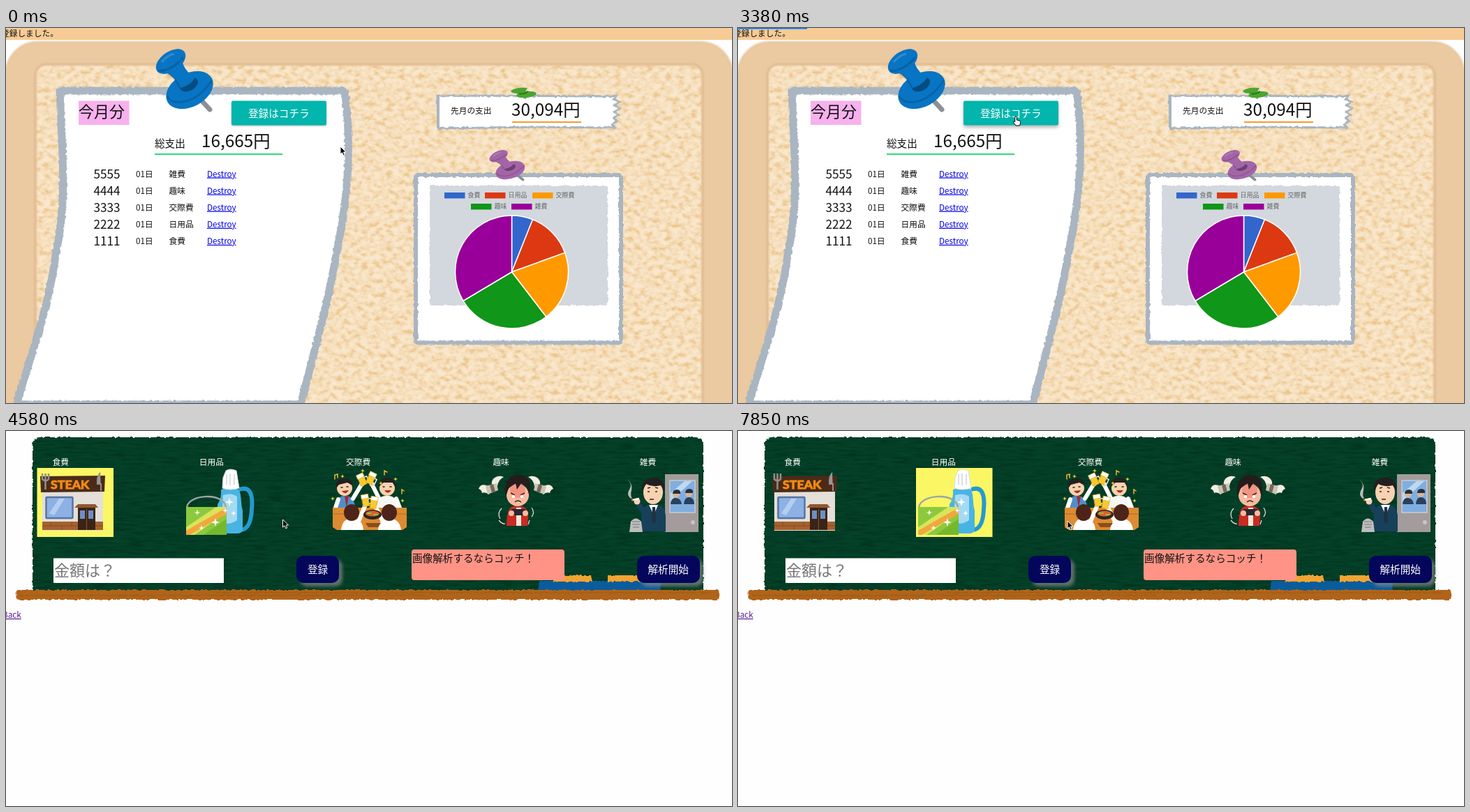
An HTML page for the animation above (8 s loop, 1040 px wide and 538 px high).

```html
<!DOCTYPE html>
<html lang="ja">
<head>
<meta charset="utf-8">
<title>家計簿</title>
<style>
html, body { margin: 0; width: 100%; height: 100%; overflow: hidden; background: #fefefe; }
svg { position: absolute; left: 0; top: 0; width: 1040px; height: 538px; }
text { font-family: "Noto Sans CJK JP", "Noto Sans CJK", "Noto Sans", sans-serif; font-size: 11.7px; fill: #111; white-space: pre; }
.link { fill: #00e; text-decoration: underline; }
.white { fill: #fff; }
.mid { font-size: 14.6px; }
.big { font-size: 22px; }
.sum { font-size: 24.3px; }
.key { font-size: 9px; fill: #666; }
#top { will-change: transform; }
</style>
</head>
<body>
<svg id="home" viewBox="0 0 1040 538">
  <defs>
    <filter id="rough" x="-5%" y="-8%" width="110%" height="116%" color-interpolation-filters="sRGB">
      <feTurbulence type="fractalNoise" baseFrequency=".2" numOctaves="2" seed="4"/>
      <feColorMatrix values="1 0 0 0 0  0 1 0 0 0  0 0 1 0 0  0 0 0 0 1"/>
      <feDisplacementMap in="SourceGraphic" scale="4" xChannelSelector="R" yChannelSelector="G"/>
    </filter>
    <filter id="cork" x="0" y="0" width="100%" height="100%" color-interpolation-filters="sRGB">
      <feTurbulence type="fractalNoise" baseFrequency=".11 .15" numOctaves="2" seed="7"/>
      <feColorMatrix values="2 0 0 0 -.45  2 0 0 0 -.45  2 0 0 0 -.45  0 0 0 0 1"/>
      <feComponentTransfer>
        <feFuncR type="table" tableValues=".93 .955 .97 .98"/>
        <feFuncG type="table" tableValues=".78 .845 .89 .91"/>
        <feFuncB type="table" tableValues=".56 .68 .77 .81"/>
      </feComponentTransfer>
      <feComposite operator="in" in2="SourceGraphic"/>
    </filter>
    <filter id="chalk" x="-2%" y="-5%" width="104%" height="110%" color-interpolation-filters="sRGB">
      <feTurbulence type="fractalNoise" baseFrequency=".2" numOctaves="2" seed="4"/>
      <feColorMatrix values="1 0 0 0 0  0 1 0 0 0  0 0 1 0 0  0 0 0 0 1" result="warp"/>
      <feDisplacementMap in="SourceGraphic" in2="warp" scale="4" xChannelSelector="R" yChannelSelector="G" result="edge"/>
      <feTurbulence type="fractalNoise" baseFrequency=".04 .3" numOctaves="3" seed="2"/>
      <feColorMatrix values="1 0 0 0 0  1 0 0 0 0  1 0 0 0 0  0 0 0 0 1"/>
      <feComponentTransfer>
        <feFuncR type="table" tableValues="0 .015 .03"/>
        <feFuncG type="table" tableValues=".18 .245 .28"/>
        <feFuncB type="table" tableValues=".11 .15 .18"/>
      </feComponentTransfer>
      <feComposite operator="in" in2="edge"/>
    </filter>
    <filter id="soft"><feGaussianBlur stdDeviation="1.2"/></filter>
    <g id="pin">
      <path d="M66 72L78 85" stroke="#8b9097" stroke-width="7" stroke-linecap="round"/>
      <ellipse cx="49" cy="57" rx="36" ry="24" transform="rotate(-28 49 57)" fill="currentColor"/>
      <path d="M17 66Q24 78 44 73T81 43" fill="none" stroke="#000" stroke-width="3" opacity=".14"/>
      <ellipse cx="48" cy="49" rx="14" ry="9" transform="rotate(-28 48 49)" opacity=".35"/>
      <path d="M12 30L37 10Q40 30 57 39Q50 51 35 54Q29 38 12 30Z" fill="currentColor"/>
      <path d="M35 54Q30 40 15 32" fill="none" stroke="#000" stroke-width="3" opacity=".14"/>
      <ellipse cx="22" cy="16" rx="24" ry="14" transform="rotate(-35 22 16)" fill="currentColor"/>
      <path d="M4 29Q22 31 40 10" fill="none" stroke="#000" stroke-width="3" opacity=".16"/>
      <path d="M9 17Q17 7 27 5" fill="none" stroke="#fff" stroke-width="3" opacity=".16"/>
    </g>
  </defs>

  <rect width="1040" height="17" fill="#f6cb95"/>
  <rect y="17" width="1040" height="521" fill="#fff"/>
  <rect x="0" y="20" width="1040" height="600" rx="45" fill="#ebc9a1" stroke="#e8c59c" stroke-width="2" filter="url(#soft)"/>
  <rect x="42" y="52" width="956" height="530" rx="16" fill="#f5dcb6" filter="url(#cork)"/>
  <rect x="42" y="52" width="956" height="530" rx="16" fill="none" stroke="#e3be93" stroke-width="4" filter="url(#soft)"/>

  <g fill="#fff" stroke="#a9b5c1" stroke-linejoin="round" filter="url(#rough)">
    <path stroke-width="11" d="M77 90H481Q486 90 486 96C496 180 487 260 474 320C460 400 440 470 422 540H15C35 470 62 400 72 320C88 250 80 170 77 90Z"/>
    <path stroke-width="3" d="M618 97L866 98 875 97 870 102 879 106 871 111 880 115 871 120 878 125 870 129 876 134 868 138 872 143 760 142 619 144Z"/>
    <rect stroke-width="6" x="587" y="211" width="294" height="240.500" rx="3"/>
    <rect x="607" y="226" width="255" height="172" rx="3" fill="#d2d8dd" stroke="none"/>
  </g>
  <path d="M619 98V143" stroke="#a9b5c1" stroke-width="4"/>

  <use href="#pin" x="214" y="32" color="#0874c4"/>
  <use href="#pin" transform="translate(692 176) scale(.62 .49)" color="#a465a8"/>
  <path d="M738 96L745 101" stroke="#8b9097" stroke-width="3"/>
  <path d="M723 90Q732 84 747 86L744 91Q760 90 760 95Q753 101 738 100Q728 99 733 94Q724 94 723 90Z" fill="#4ba52f"/>
  <path d="M735 94Q741 96 748 91" fill="none" stroke="#287a1d" stroke-width="2"/>

  <text x="-7" y="12">登録しました。</text>
  <rect x="104" y="104.500" width="72.500" height="34.500" fill="#f7b1ed"/>
  <text x="104" y="128" class="big">今月分</text>
  <rect id="btn" x="323" y="104.500" width="136" height="35" rx="2" fill="#02b5ad"/>
  <text x="347" y="127.500" class="mid white">登録はコチラ</text>
  <text x="213" y="171" class="mid">総支出</text>
  <text x="280" y="171" class="sum">16,665円</text>
  <rect x="213" y="180" width="183" height="2" fill="#2cdb79"/>
  <text x="637" y="123">先月の支出</text>
  <text x="724" y="126" class="sum">30,094円</text>
  <rect x="725" y="134" width="99" height="2" fill="#f49b31"/>
  <g id="rows"></g>
  <g id="chart"></g>
</svg>

<svg id="form" viewBox="0 0 1040 538">
  <rect width="1040" height="538" fill="#fefefe"/>
  <rect x="38" y="9" width="961" height="226" rx="10" fill="#043f27" filter="url(#chalk)"/>
  <g filter="url(#rough)">
    <path d="M764 215H938V230H762Z" fill="#0a5c9c"/>
    <path d="M786 207H838L840 216H784ZM862 207H934L936 216H862Z" fill="#f2a431"/>
    <rect x="14.500" y="228" width="1007" height="14" rx="4" fill="#b0641a"/>
    <path d="M20 236H600M300 232H1010" stroke="#a75b13" stroke-width="1.500"/>
  </g>
  <g id="labels"></g>
  <rect id="pick" y="53" width="109.500" height="99" fill="#fbf664"/>

  <!-- restaurant -->
  <g>
    <path d="M52 86H139V143H52Z" fill="#e4dfd9"/>
    <path d="M52 130H139V142H52Z" fill="#a4622f"/>
    <path d="M52 136H139M64 130V136M80 136V142M94 130V136" stroke="#874b20"/>
    <path d="M49 65L142 64 141 87 50 88Z" fill="#4b2b18"/>
    <text x="64" y="83" style="font:bold 17.800px Lato,sans-serif;fill:#f58b13;stroke:#f58b13">STEAK</text>
    <rect x="57.500" y="95" width="38" height="30" rx="1" fill="#8db0e5" stroke="#57749f" stroke-width="2.500"/>
    <path d="M62 118L76 97H84L69 121Z" fill="#b5cdef"/>
    <path d="M98 110L103 105H128L132 110Z" fill="#90572f"/>
    <path d="M103 110H128V142H103Z" fill="#3b2417"/>
    <path d="M106 114H113V126H106ZM118 114H125V126H118Z" fill="#6d8fc6"/>
    <path d="M115.500 112V142" stroke="#805536"/>
    <path d="M52 61V69Q57 74 61 69V61M56.500 61V84" fill="none" stroke="#8f8f8f" stroke-width="2.500"/>
    <path d="M135 60Q130 66 131 76H136V86" fill="#999" stroke="#8f8f8f" stroke-width="2"/>
  </g>

  <!-- detergent -->
  <g>
    <path d="M334 84C350 78 354 92 352 112Q351 140 337 142" fill="none" stroke="#249ad0" stroke-width="6"/>
    <path d="M308 84Q321 79 334 84C338 95 336 104 339 114V142Q338 147 331 147H307Q302 147 303 140V105Q309 97 308 84Z" fill="#48b4e3"/>
    <path d="M311 92Q323 88 331 94V128Q318 137 309 129Z" fill="#a4daf2"/>
    <path d="M310 82L311 67 315 57Q321 53 330 57L334 82Q321 86 310 82Z" fill="#fff" stroke="#d3dde0"/>
    <path d="M316 62V77M321 61V78M327 62V77" stroke="#cbd6da" stroke-width="1.500"/>
    <path d="M259 110C260 91 311 87 315 109" fill="none" stroke="#9aa7a3" stroke-width="2.500"/>
    <path d="M258 109H316V149H258Z" fill="#8dc93d"/>
    <path d="M258 138L301 109H316V117L270 149H258Z" fill="#d9e45a"/>
    <path d="M258 143L316 110V119L263 149H258Z" fill="#f2a73c"/>
    <path d="M283 149L316 126V149Z" fill="#74b92d"/>
    <g id="shine" fill="#fff"></g>
  </g>

  <!-- party -->
  <g stroke-linecap="round">
    <path d="M474 112Q472 92 486 93Q500 93 500 112Z" fill="#4f8fc9"/>
    <path d="M531 112Q530 92 546 93Q561 92 562 112Z" fill="#f6f6f2"/>
    <path d="M497 97L509 77M534 96L524 76M476 98L472 110M559 97L564 110" stroke="#fff" stroke-width="6"/>
    <path d="M485 93L488 110 491 94Z" fill="#a32b35"/>
    <g fill="#fad2ae">
      <circle cx="485" cy="82" r="11"/><circle cx="546" cy="82" r="11"/>
      <circle cx="510" cy="76" r="3.500"/><circle cx="524" cy="76" r="3.500"/>
    </g>
    <path d="M473 82Q471 68 484 68Q497 67 496 78L489 74 477 77ZM534 80Q534 66 547 67Q559 68 558 81L554 74 541 74Z" fill="#23201f"/>
    <path d="M480 81H482M488 80H490M540 80H542M550 80H552" stroke="#222" stroke-width="1.500"/>
    <path d="M481 86Q486 93 491 85ZM542 85Q547 92 552 85Z" fill="#a92e24"/>
    <path d="M468 110H574V138L568 142H474L468 138Z" fill="#dc8b32"/>
    <path d="M468 119H574" stroke="#b8681d"/>
    <path d="M480 142Q482 125 495 126Q511 125 512 142ZM533 142Q534 125 548 126Q564 125 566 142Z" fill="#fff"/>
    <path d="M505 130L514 108M540 130L529 108" stroke="#fff" stroke-width="6"/>
    <g fill="#4c2419"><ellipse cx="495" cy="117" rx="11" ry="12"/><ellipse cx="549" cy="117" rx="11" ry="12"/></g>
    <ellipse cx="525" cy="120" rx="13" ry="7" fill="#2e2520"/><ellipse cx="525" cy="118.500" rx="10" ry="4" fill="#d9602c"/>
    <path d="M518 118H523M527 120H532" stroke="#8bc34a" stroke-width="2"/>
    <path d="M515 132H537L533 138H519Z" fill="#8a4d1c"/>
    <g id="beers" stroke="#e5ad22" stroke-width=".7"></g>
    <g id="stars" fill="#f8dc38"></g>
    <path d="M471 69V63L475 62V67M542 63V57L546 59M567 90V84L570 86" fill="none" stroke="#f0b73a" stroke-width="1.500"/>
  </g>

  <!-- gamer -->
  <g>
    <g id="wing">
      <path d="M697 80C692 69 704 62 713 66Q705 70 704 79ZM691 79Q680 74 677 83Q681 84 682 89Q686 87 692 91Z" fill="#f2eee2"/>
      <path d="M687 79L703 75 705 85 690 91Z" fill="#c9c5b4"/>
      <path d="M693 78L698 76 701 87 696 89Z" fill="#75675b"/>
    </g>
    <use href="#wing" transform="translate(1461 0) scale(-1 1)"/>
    <path d="M717 136Q717 109 727 108H739Q748 110 748 122L747 136Z" fill="#ca2b22"/>
    <path d="M731 110H738V136H731Z" fill="#f3eadc"/>
    <circle cx="733" cy="92" r="16" fill="#f6bba0"/>
    <circle cx="733" cy="85" r="11" fill="#ef7a6d" opacity=".6"/>
    <path d="M716 94Q711 71 727 64Q749 59 751 80L750 94 746 80 738 75 732 84 730 75 720 82Z" fill="#251c1c"/>
    <path d="M723 89L729 92M743 89L737 92M729 102Q733 98 738 102" fill="none" stroke="#4b201d" stroke-width="1.500"/>
    <circle cx="727" cy="94" r="2.200" fill="#fff"/><circle cx="739" cy="94" r="2.200" fill="#fff"/>
    <path d="M724 112H744L743 121H725Z" fill="#262a30"/>
    <circle cx="724" cy="118" r="4" fill="#f6bba0"/><circle cx="744" cy="118" r="4" fill="#f6bba0"/>
    <path d="M710 111Q703 118 708 126M706 128Q711 134 715 133M753 110Q758 117 753 123M750 128L748 134" fill="none" stroke="#e9e9e4" stroke-width="1.200"/>
  </g>

  <!-- smoker -->
  <g>
    <path d="M944 62H992V145H944Z" fill="#a49c9c"/>
    <path d="M951 71H987V117H951Z" fill="#7faee0" stroke="#c9cbd0" stroke-width="1.500"/>
    <path d="M952 89L972 72H983L952 101Z" fill="#bed8f2"/>
    <path d="M952 105Q953 95 960 96T968 105ZM971 105Q972 94 979 95T986 105Z" fill="#29415c"/>
    <circle cx="960" cy="91" r="5" fill="#d9b59b"/><circle cx="978" cy="90" r="5" fill="#d9b59b"/>
    <path d="M955 90Q955 84 961 84T966 90ZM973 89Q973 83 979 83T984 89Z" fill="#28303b"/>
    <circle cx="984" cy="131" r="3" fill="#c9c5c4"/>
    <path d="M909 144L911 117Q914 105 923 106H934Q944 108 945 121V144Z" fill="#17415a"/>
    <path d="M921 106H934L928 121Z" fill="#fff"/><path d="M926 109H930L931 129 928 133 925 129Z" fill="#203142"/>
    <path d="M914 117L906 105" stroke="#17415a" stroke-width="8"/>
    <ellipse cx="927" cy="88" rx="14" ry="17" fill="#f8d2b1"/>
    <path d="M911 86Q909 68 927 67Q945 67 943 86L938 78Q926 81 917 76Z" fill="#211f20"/>
    <path d="M919 87H922M930 87H933M919 82L923 81M930 81L934 82M922 98H928" stroke="#35261f" stroke-width="1.500"/>
    <circle cx="904" cy="101" r="4.500" fill="#f8d2b1"/>
    <path d="M897 99L907 97" stroke="#fff" stroke-width="2.500"/><path d="M896 99H898" stroke="#e45b23" stroke-width="3"/>
    <path d="M895 97Q888 91 893 84T890 69Q898 76 896 85T897 96Z" fill="#b7beb9"/>
    <path d="M893 145L895 130Q902 121 910 130L912 145Z" fill="#bdbebd"/>
    <path d="M897 130H908M897 134H908M898 138H907" stroke="#777"/>
  </g>

  <rect x="68" y="182.500" width="244" height="35.500" fill="#fff"/>
  <text x="69" y="208" class="big" style="fill:#777">金額は？</text>
  <rect x="581" y="170" width="219" height="44" rx="4" fill="#ff9385"/>
  <text x="582" y="188" class="mid">画像解析するならコッチ！</text>
  <g fill="#03065b" style="filter:drop-shadow(5px 5px 2px #8a8a8aaa)">
    <rect x="416" y="179" width="61" height="39" rx="10"/>
    <rect x="904" y="179" width="90" height="39" rx="10"/>
  </g>
  <g font-weight="500">
    <text x="432" y="204" class="mid white">登録</text>
    <text x="919.500" y="204" class="mid white">解析開始</text>
  </g>
  <text x="-5" y="268" style="fill:#551a8b;text-decoration:underline">Back</text>
</svg>

<svg id="top" viewBox="0 0 1040 538">
  <rect id="bar" height="1.500" fill="#0076ff"/>
  <g id="cursor" stroke="#fff" stroke-width="1" stroke-linejoin="round">
    <path id="arrow" d="M0 0V11L2.500 8.800 4.300 12.800 6.200 12 4.500 8H8Z" fill="#000"/>
    <path id="hand" d="M-1.300 8V1.200a1.300 1.300 0 0 1 2.600 0V5L5 5.800C6.800 6.200 6.800 8 6.400 10L5.500 13H0L-3.600 8.300C-4 7-2.500 6.300-1.300 8Z" fill="#fff" stroke="#000"/>
  </g>
</svg>

<script>
const $ = id => document.getElementById(id);
const text = (x, y, s, cls = "", size) =>
  `<text x="${x}" y="${y}" class="${cls}"${size ? ` style="font-size:${size}px"` : ""}>${s}</text>`;

const kinds = ["食費", "日用品", "交際費", "趣味", "雑費"];
const colors = ["#3366cc", "#dc3912", "#ff9900", "#109618", "#990099"];
const shares = [1000, 2222, 3333, 4444, 5555];
const legend = [[628, 240], [686, 240], [754, 240], [666, 256], [724, 256]];

$("rows").innerHTML = [5, 4, 3, 2, 1].map((n, i) => {
  const y = 213.5 + i * 24.1;
  return text(125.5, y + 2, String(n).repeat(4), "", 17.2) + text(186, y, "01日") +
    text(233.5, y, kinds[n - 1]) + text(288, y, "Destroy", "link");
}).join("");

const sum = list => list.reduce((a, b) => a + b, 0);
const rim = k => {
  const a = sum(shares.slice(0, k)) / sum(shares) * 2 * Math.PI;
  return `${724.5 + 81 * Math.sin(a)} ${350 - 81 * Math.cos(a)}`;
};
$("chart").innerHTML = kinds.map((name, i) => {
  const [x, y] = legend[i];
  return `<rect x="${x}" y="${y - 4}" width="29.500" height="8.500" fill="${colors[i]}"/>` +
    text(x + 33.5, y + 3.3, name, "key") +
    `<path d="M724.5 350L${rim(i)}A81 81 0 0 1 ${rim(i + 1)}Z" fill="${colors[i]}" stroke="#fff" stroke-width="1.500"/>`;
}).join("");

$("labels").innerHTML = kinds.map((name, i) => text(66.5 + i * 210.3, 48.5, name, "white")).join("");

const spark = (x, y, r) => {
  const q = r / 4;
  return `<path d="M${x} ${y - r}l${q} ${r - q} ${r - q} ${q} ${q - r} ${q} ${-q} ${r - q} ${-q} ${q - r} ${q - r} ${-q} ${r - q} ${-q}Z"/>`;
};
const sparks = list => list.map(p => spark(...p)).join("");
$("shine").innerHTML = sparks([[320, 102, 6], [314, 114, 4], [326, 118, 4], [274, 117, 4], [300, 131, 6], [280, 139, 4]]);
$("stars").innerHTML = sparks([[468, 97, 3], [511, 57, 3], [537, 75, 3], [558, 69, 3], [568, 100, 3], [482, 65, 3]]);
$("beers").innerHTML = [[510, 70, -25], [523, 68, 25], [515, 100, -10], [527, 103, 10]].map(([x, y, turn]) =>
  `<g transform="translate(${x} ${y}) rotate(${turn})"><path d="M-4.500-6H4.500V8H-4.500Z" fill="#f9c92f"/>` +
  `<path d="M-5-9H5V-3H-5Z" fill="#fff"/><path d="M5-2H8V5H5" fill="none" stroke="#eee" stroke-width="1.500"/></g>`).join("");

// Stepped values: the last key whose time has come is the one shown.
const moves = [
  [0, 479, 170], [600, 477, 168], [750, 470, 161], [900, 456, 151], [1050, 440, 141],
  [1190, 427, 132], [1340, 418, 125], [1490, 415, 123], [1760, 416, 122.5], [1900, 415, 122.5],
  [2350, 409, 125], [2490, 405, 126], [2640, 400, 127], [2790, 398, 127], [4430, 396.5, 127],
  [6080, 396.5, 127], [6230, 380, 128], [6380, 347, 125], [6530, 305, 119], [6680, 263, 115],
  [6820, 244, 116], [6960, 283, 128], [7110, 323, 137], [7260, 323, 132.5],
  [7700, 386, 130], [7850, 472, 129]
];
const loads = [[0, 0], [3380, 99], [3980, 102], [4130, 104], [4280, 106], [4430, 831], [4580, 0]];
const at = (keys, t) => keys.filter(k => k[0] <= t).pop();
const show = (id, on) => $(id).style.display = on ? "" : "none";

function draw(t) {
  const form = t >= 4430;
  show("home", !form);
  show("form", form);

  const [, x, y] = at(moves, t);
  const hand = t >= 1490 && t < 4130;
  $("cursor").setAttribute("transform", `translate(${x} ${y})`);
  show("hand", hand);
  show("arrow", !hand);

  const lift = Math.max(0, Math.min(3, Math.floor((t - 2350) / 146)));
  $("btn").style.filter = `drop-shadow(0 ${1.5 + lift * .5}px ${1 + lift * .6}px rgba(0,0,0,.3))`;
  $("bar").setAttribute("width", at(loads, t)[1]);
  $("pick").setAttribute("x", t < 7550 ? 44.5 : 255);
}

const start = performance.now();
function tick() {
  draw((performance.now() - start) % 8000);
  requestAnimationFrame(tick);
}
tick();
</script>
</body>
</html>
```
